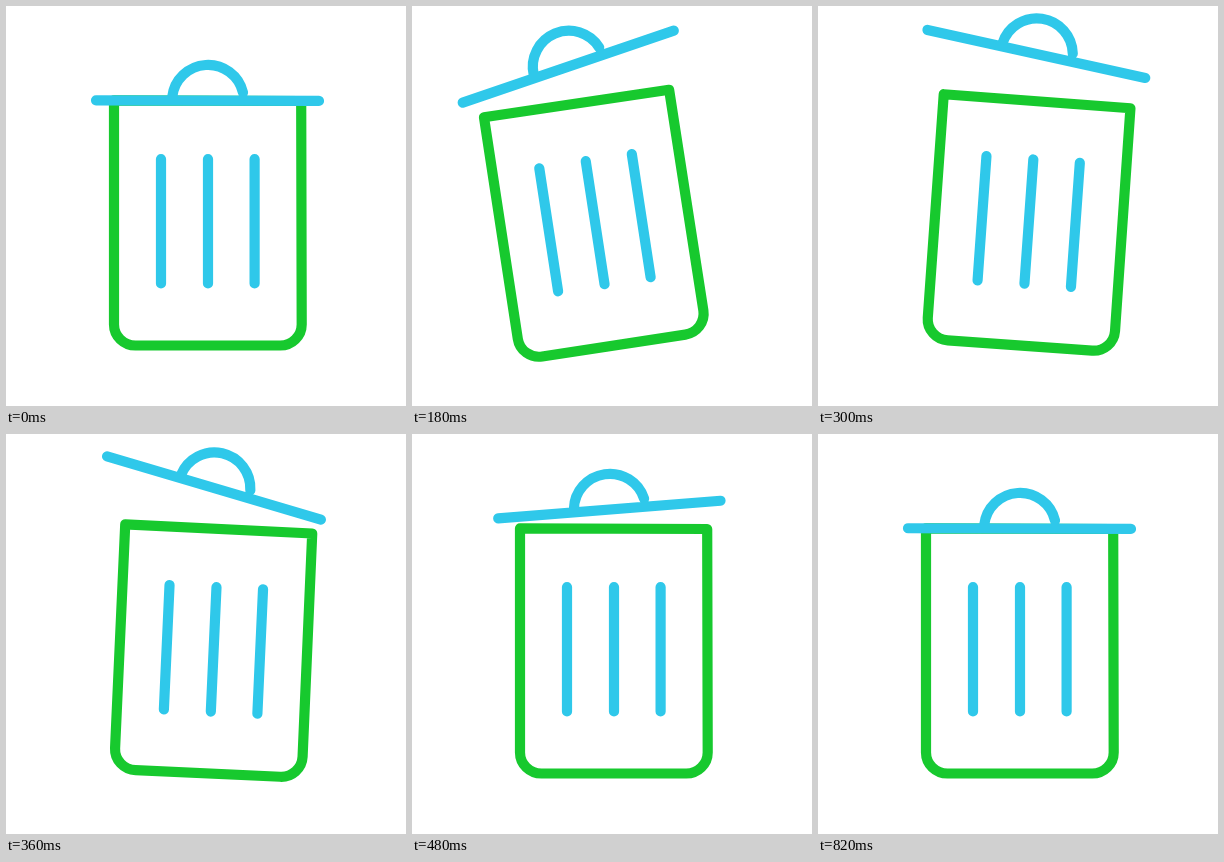
An HTML page for the animation above (0.84 s loop, 400 by 400 pixels).

```html
<!DOCTYPE html>
<html lang="en">
<head>
<meta charset="utf-8">
<title>Trash can</title>
<style>
  html, body { margin: 0; width: 100%; height: 100%; overflow: hidden; background: #fff; }
  svg { display: block; width: 100vw; height: 100vh; }
  path { fill: none; stroke-width: 10.2; stroke-linecap: round; stroke-linejoin: round; }
  .can { stroke: #17c92e; }
  .blue { stroke: #2fc8ea; }
</style>
</head>
<body>
<svg viewBox="0 0 400 400">
  <g id="bin">
    <path class="can" d="M108 94.3 L295.2 95 L295.7 318.5 A21.5 21 0 0 1 274.2 339.5 H129.5 A21.5 21 0 0 1 108 318.5 Z"/>
    <path class="blue" d="M155 153 V277.5 M202 153 V277.5 M248.6 153 V277.5"/>
    <g id="lid">
      <path class="blue" d="M-111.5 -.3 L111.5 .3 M-35.3 -3.5 A36 36 0 0 1 35.5 -8.1"/>
    </g>
  </g>
</svg>
<script>
const LOOP = 840, STEP = 20, REST = 820;
const bin = document.getElementById('bin');
const lid = document.getElementById('lid');

// Progress from 0 to 1 between two times, plain and eased.
const part = (t, from, to) => Math.min(1, Math.max(0, (t - from) / (to - from)));
const easeOut = (t, from, to) => 1 - (1 - part(t, from, to)) ** 2;
const easeInOut = (t, from, to) => {
  const u = part(t, from, to);
  return u * u * (3 - 2 * u);
};

// The bin is knocked left, swings over to the right and stands up again.
const swing = t => -9.8 * easeOut(t, 0, 110)
  + 15 * easeInOut(t, 150, 330)
  - 5.2 * easeInOut(t, 330, 390);

// The lid flips open, tips over, then wobbles out.
function lidTurn(t) {
  const s = t - 360;
  if (s < 0) return -10.7 * easeOut(t, 0, 110) + 24.4 * easeInOut(t, 165, 360);
  return 13.7 * Math.exp(-s / 115) * Math.cos(2 * Math.PI * s / 260);
}

// It is thrown up and floats back down.
const lidLift = t => 47.5 * easeOut(t, 0, 330) * (1 - part(t, 330, REST)) ** 2.5;

const lidDrift = t => (3.8 * easeOut(t, 0, 110)
  - 2.3 * easeInOut(t, 110, 240)
  + 5 * easeInOut(t, 240, 360)) * (1 - part(t, 360, REST)) ** 1.5;

function draw(ms) {
  const t = Math.floor((ms % LOOP) / STEP) * STEP;
  const x = 201.5 - lidDrift(t), y = 94.6 - lidLift(t);
  bin.setAttribute('transform', `rotate(${swing(t)} 202 340)`);
  lid.setAttribute('transform', `translate(${x} ${y}) rotate(${lidTurn(t)})`);
}

const start = performance.now();
function tick() {
  draw(performance.now() - start);
  requestAnimationFrame(tick);
}
tick();
</script>
</body>
</html>
```
